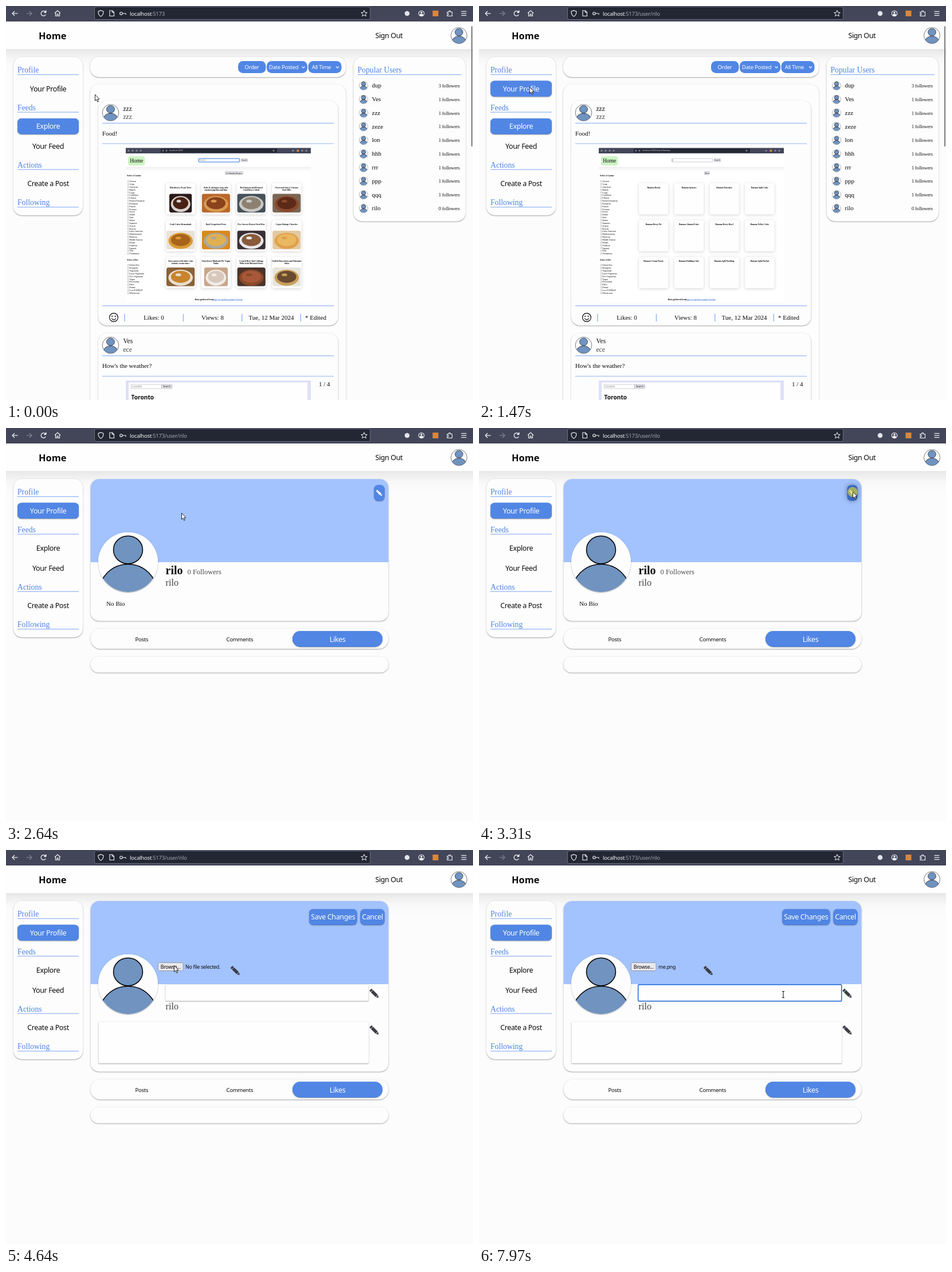
Write an HTML page with a canvas that moves like this. It is 815x687 px and loops after 8 s.

```html
<!DOCTYPE html>
<html lang="en">
<head>
<meta charset="utf-8">
<title>Profile editing</title>
<style>
html, body { margin: 0; width: 100%; height: 100%; overflow: hidden; background: #fcfcfc; }
canvas { display: block; width: 815px; height: 687px; }
</style>
</head>
<body>
<canvas id="stage"></canvas>
<script>
const W = 815, H = 687, LOOP = 8000;
const canvas = document.getElementById('stage');
const ctx = canvas.getContext('2d');
const dpr = window.devicePixelRatio || 1;
canvas.width = W * dpr;
canvas.height = H * dpr;

const SANS = '"Noto Sans", sans-serif', SERIF = '"Liberation Serif", serif';
const BLUE = '#5186e5', DARK = '#3a69c0', LINE = '#94b6f8', HEAD = '#4c83e4', INK = '#0a0a0a';
const ME = 'rilo';
const USERS = ['dup', 'Ves', 'zzz', 'zeze', 'lon', 'hhh', 'rrr', 'ppp', 'qqq', ME];

// Shadows as [alpha, blur, drop]
const SOFT = [[0.14, 2.2, 0.7], [0.3, 1.5, 0.8]];
const GLOW = [[0.4, 9, 0]];
const HAZE = [[0.13, 26, 5]];
const FAINT = [[0.17, 5, 1]];

// Drawing helpers
function text(s, x, y, size, o = {}) {
  const sans = o.sans || o.ui;
  ctx.font = `${o.bold ? 'bold ' : ''}${size}px ${sans ? SANS : SERIF}`;
  ctx.letterSpacing = sans && !o.bold ? `${-0.031 * size}px` : '0px';
  ctx.textAlign = o.align || 'left';
  ctx.fillStyle = o.color || INK;
  ctx.fillText(s, x, y);
}
const label = (s, x, y, size = 12.5, color = INK) => text(s, x, y, size, { sans: true, align: 'center', color });

function path(x, y, w, h, r) {
  ctx.beginPath();
  ctx.roundRect(x, y, w, h, r);
}
function box(x, y, w, h, r, fill, stroke, lw = 1) {
  path(x, y, w, h, r);
  if (fill) { ctx.fillStyle = fill; ctx.fill(); }
  if (stroke) { ctx.strokeStyle = stroke; ctx.lineWidth = lw; ctx.stroke(); }
}
function shadowed(x, y, w, h, r, fill, shadows = SOFT) {
  ctx.save();
  for (const [alpha, blur, drop] of shadows) {
    ctx.shadowColor = `rgba(0,0,0,${alpha})`;
    ctx.shadowBlur = blur * dpr;
    ctx.shadowOffsetY = drop * dpr;
    box(x, y, w, h, r, fill);
  }
  ctx.restore();
}
const card = (x, y, w, h, r = 15) => shadowed(x, y, w, h, r, '#fdfdfd');
function disc(x, y, rx, fill, stroke, lw = 1, ry = rx) {
  ctx.beginPath();
  ctx.ellipse(x, y, rx, ry, 0, 0, 7);
  if (fill) { ctx.fillStyle = fill; ctx.fill(); }
  if (stroke) { ctx.strokeStyle = stroke; ctx.lineWidth = lw; ctx.stroke(); }
}
function lines(pts, color, lw = 1, closed, fill) {
  ctx.beginPath();
  for (let i = 0; i < pts.length; i += 2) ctx.lineTo(pts[i], pts[i + 1]);
  if (closed) ctx.closePath();
  if (fill) { ctx.fillStyle = fill; ctx.fill(); }
  ctx.strokeStyle = color;
  ctx.lineWidth = lw;
  ctx.stroke();
}
const rule = (x1, x2, y) => lines([x1, y, x2, y], LINE, 1.2);

function avatar(x, y, r) {
  const k = r / 52, big = r > 30;
  if (big) shadowed(x - r, y - r, 2 * r, 2 * r, r, '#fdfdfd');
  ctx.save();
  ctx.beginPath();
  ctx.arc(x, y, r, 0, 7);
  ctx.clip();
  ctx.fillStyle = '#fdfdfd';
  ctx.fillRect(x - r, y - r, 2 * r, 2 * r);
  const lw = big ? 1.5 : 0.6;
  disc(x, y - 21.5 * k, 25.5 * k, '#7093c0', 'black', lw, 24.2 * k);
  disc(x, y + 54.8 * k, 51.4 * k, '#7093c0', 'black', lw);
  ctx.restore();
  if (!big) disc(x, y, r, null, r > 10 ? '#555a62' : '#a4a8ae', 0.8);
}

function pencil(x, y, k, color) {
  ctx.save();
  ctx.translate(x, y);
  ctx.rotate(Math.PI / 4);
  ctx.scale(k, k);
  ctx.fillStyle = color;
  path(-10, -2.7, 3.4, 5.4, 1);
  ctx.fill();
  ctx.fillRect(-6, -2.7, 11.5, 5.4);
  ctx.beginPath();
  ctx.moveTo(6.3, -2.7);
  ctx.lineTo(10.3, 0);
  ctx.lineTo(6.3, 2.7);
  ctx.fill();
  ctx.restore();
}

// Pointer
const clamp = u => Math.max(0, Math.min(1, u));
const span = (t, a, b) => clamp((t - a) / (b - a));
const smooth = u => u * u * (3 - 2 * u);
const mix = (a, b, u) => a + (b - a) * u;
const out = (u, n) => 1 - Math.pow(1 - u, n);

function pointer(t) {
  if (t < 2300) {
    const a = smooth(span(t, 40, 860)), b = span(t, 960, 1190);
    return [mix(155, 91, a) - 3 * b, mix(154, 143, a) - 2 * b];
  }
  if (t < 3580) {
    const u = smooth(span(t, 2280, 3130)), v = span(t, 3130, 3240);
    return [mix(88, 650, u) + 2 * v, mix(141, 112, u) + 24 * Math.sin(Math.PI * u) * (1 - u * 0.5) - v];
  }
  if (t < 5180) {
    const u = span(t, 3590, 4440);
    return [mix(652, 293, out(u, 1.9)), mix(111, 201, out(u, 3.2))];
  }
  if (t < 6780) return null;
  const u = smooth(span(t, 6720, 7400));
  return [mix(724, 531, u), mix(228, 252, u)];
}
const over = (p, x, y, w, h) => p && p[0] >= x && p[0] <= x + w && p[1] >= y && p[1] <= y + h;
const within = (t, a, b) => t >= a && t < b;
const clicking = t => within(t, 1330, 1470) || within(t, 3240, 3370) || within(t, 4570, 4640) || within(t, 7400, 7510);

function drawPointer(p, t) {
  if (!p) return;
  const [x, y] = p;
  if (clicking(t)) disc(x, y + 0.5, 8.7, 'rgba(222,214,50,.62)');
  if (t > 6780 && over(p, 278, 235, 355, 29)) {
    lines([x - 2, y - 5.5, x + 2, y - 5.5], 'black', 1);
    lines([x - 2, y + 5.5, x + 2, y + 5.5], 'black', 1);
    lines([x, y - 5.5, x, y + 5.5], 'black', 1);
    return;
  }
  ctx.save();
  ctx.translate(x + 0.5, y + 0.5);
  ctx.lineJoin = 'round';
  lines([0, 0, 0, 10.8, 2.4, 8.7, 4.2, 12.8, 5.9, 12, 4.2, 8.1, 7.3, 7.8], '#111', 0.9, true, 'white');
  ctx.restore();
}

// Browser bar
function browser(t) {
  const c = '#f4f4f8';
  ctx.fillStyle = '#434659';
  ctx.fillRect(0, 0, W, 27);
  box(154.5, 1.5, 481, 22, 2.5, '#232633', '#6a6d80');
  lines([20.5, 13, 11, 13], c, 1.2);
  lines([15, 9, 11, 13, 15, 17], c, 1.2);
  lines([36, 13, 45, 13], '#83859a', 1.2);
  lines([41, 9, 45, 13, 41, 17], '#83859a', 1.2);
  ctx.beginPath();
  ctx.arc(65.5, 13, 4.3, 0.5, 5.4);
  ctx.strokeStyle = c;
  ctx.lineWidth = 1.2;
  ctx.stroke();
  lines([70, 7.8, 70, 11.5, 66.5, 11.5], c, 1, true, c);
  lines([85, 12.5, 90, 8, 95, 12.5], c, 1.2);
  lines([86.5, 12, 86.5, 17.5, 89, 17.5, 89, 14, 91, 14, 91, 17.5, 93.5, 17.5, 93.5, 12], c, 1.1);
  ctx.beginPath();
  ctx.moveTo(165.5, 7.7);
  ctx.lineTo(170, 9.4);
  ctx.quadraticCurveTo(170, 16, 165.5, 18.2);
  ctx.quadraticCurveTo(161, 16, 161, 9.4);
  ctx.closePath();
  ctx.stroke();
  lines([181, 8, 185.5, 8, 188.5, 11, 188.5, 17.5, 181, 17.5], c, 1.1, true);
  lines([185.3, 8, 185.3, 11.2, 188.5, 11.2], c, 1);
  disc(201, 13, 2.3, null, c, 1.1);
  lines([203.4, 13, 209, 13, 209, 15.3], c, 1.1);
  text('localhost', 216, 16.5, 9.6, { ui: true, color: '#f8f8fb' });
  const w = ctx.measureText('localhost').width;
  text(':5173' + (t >= 1470 ? '/user/' + ME : ''), 216 + w, 16.5, 9.6, { ui: true, color: '#a3a5b2' });
  const star = [];
  for (let i = 0; i < 10; i++) {
    const a = -Math.PI / 2 + i * Math.PI / 5, r = i % 2 ? 2.5 : 5.6;
    star.push(625 + r * Math.cos(a), 13.2 + r * Math.sin(a));
  }
  lines(star, c, 1, true);
  disc(700, 13, 4.3, '#e4e4ec');
  disc(725, 13, 4.8, null, c, 1.1);
  disc(725, 11.4, 1.7, c);
  disc(725, 15.4, 3, c, null, 1, 1.8);
  box(744.5, 8, 10, 10, 0, '#d9873c');
  lines([770, 10.5, 773, 10.5, 773, 8.5, 775.5, 8.5, 775.5, 10.5, 778.5, 10.5, 778.5, 17.5, 770, 17.5, 770, 15, 772, 15, 772, 13, 770, 13], c, 1.1, true);
  for (const y of [9.5, 13, 16.5]) lines([794.5, y, 803.5, y], c, 1.2);
}

function header() {
  shadowed(-30, 27, W + 60, 48, 0, '#fefefe', HAZE);
  text('Home', 57, 58, 16.4, { sans: true, bold: true });
  text('Sign Out', 644.5, 56, 12.5, { sans: true });
  avatar(790.5, 51.5, 14);
}

function button(s, x, y, w, h, p, size = 12.5, dim = true) {
  const hot = dim && over(p, x, y, w, h);
  shadowed(x, y, w, h, 7, hot ? DARK : BLUE, hot ? GLOW : SOFT);
  if (s) label(s, x + w / 2, y + h / 2 + size * 0.36, size, 'white');
}

function sidebar(t, p) {
  card(13, 89, 121, 276);
  [['Profile', 116], ['Feeds', 181.5], ['Actions', 281.5], ['Following', 347]].forEach(([s, y]) => {
    text(s, 20, y, 13.7, { color: HEAD });
    rule(20, 127, y + 3.6);
  });
  const active = t < 1670 ? 'Explore' : 'Your Profile';
  [['Your Profile', 130.5], ['Explore', 196], ['Your Feed', 230.5], ['Create a Post', 296]].forEach(([s, y]) => {
    if (s === active || over(p, 20, y, 107, 27.5)) button(s, 20, y, 107, 27.5, p, 12.5, false);
    else label(s, 73.5, y + 18.3);
  });
}

// Recipe page shown inside the first post
const CUISINES = 'African,Asian,American,British,Cajun,Caribbean,Chinese,Eastern European,European,French,German,Greek,Indian,Irish,Italian,Japanese,Jewish,Korean,Latin American,Mediterranean,Mexican,Middle Eastern,Nordic,Southern,Spanish,Thai,Vietnamese'.split(',');
const DIETS = 'Gluten Free,Ketogenic,Vegetarian,Lacto-Vegetarian,Ovo-Vegetarian,Vegan,Pescetarian,Paleo,Primal,Low FODMAP,Wholesome'.split(',');
const DISHES = [
  ['Blackberry Pecan Torte', '#2a1a18 #d8d2cc #4a2214'],
  ['Kale & chickpea soup with|smoked paprika and lime', '#b9682c #d89a50 #8a431c'],
  ['Red Quinoa and Roasted|Cauliflower Salad', '#46525a #c9c8c4 #8d8272'],
  ['Sweet and Saucy Country|Style Ribs', '#7b6656 #8a4a2c #5c2a18'],
  ['Crab Cakes Remoulade', '#e9e2d8 #d99a35 #a8641c'],
  ['Basil Grapefruit Pesto', '#d98a1e #a9a8a0 #e0b050'],
  ['Five Savory Brown Fried Rice', '#3a3034 #e8e8ea #8a5a3c'],
  ['Cajun Shrimp Chowder', '#e3c9a0 #dfa04c #e9b860'],
  ['Swiss pasta with white wine|tomato cream sauce', '#8a6238 #e6dfd0 #c8842c'],
  ['Strawberry Rhubarb Pie Vegan|Shake', '#c9a68c #f0ede8 #d8c8bc'],
  ['Corned Beef And Cabbage|With Irish Mustard Sauce', '#4a332a #8a4a28 #a8583a'],
  ['Grilled Bruschetta and Balsamic|Salsa', '#e8e4dc #c9a05a #6a4a30']
];
const BANANA = 'Bread,Spritzer,Pancakes,Split Cake,Berry Pie,Almond Cake,Berry Bowl,Yellow Cake,Cream Pastry,Pudding Cake,Split Pudding,Split Parfait'.split(',');

function photo(x, y, w, colors) {
  const [back, plate, food] = colors.split(' ');
  ctx.save();
  path(x, y, w, 33, 4);
  ctx.clip();
  ctx.fillStyle = back;
  ctx.fillRect(x, y, w, 33);
  disc(x + w / 2, y + 18, w * 0.43, plate, null, 1, 14);
  disc(x + w / 2, y + 16.5, w * 0.34, food, null, 1, 10.5);
  disc(x + w * 0.42, y + 13, w * 0.1, plate, null, 1, 2.5);
  ctx.restore();
}

function checklist(title, items, y) {
  text(title, 211, y, 3.7, { bold: true });
  items.forEach((s, i) => {
    const by = y + 9.8 + i * 4.85;
    box(212, by - 2.8, 2.7, 2.7, 0.4, 'white', '#777', 0.4);
    text(s, 215.6, by, 3.7);
  });
}

function recipes(t) {
  const done = t >= 1190, small = { align: 'center', bold: true };
  ctx.fillStyle = 'white';
  ctx.fillRect(209, 248, 323, 268);
  ctx.fillStyle = '#434659';
  ctx.fillRect(209, 247.5, 323, 9.5);
  box(270, 248.5, 203, 7, 1, '#232633');
  for (const x of [214, 221, 228, 235, 274, 280, 467, 501, 517, 524]) disc(x, 252.2, 1.1, null, '#d8d8e0', 0.6);
  box(507.5, 250.5, 3.6, 3.6, 0, '#d9873c');
  text('localhost:3000' + (done ? '/search/banana' : ''), 285, 253.4, 3.7, { ui: true, color: '#d0d0d8' });
  const fade = ctx.createLinearGradient(0, 280, 0, 288);
  fade.addColorStop(0, '#eeeef0');
  fade.addColorStop(1, '#fefefe');
  ctx.fillStyle = fade;
  ctx.fillRect(209, 280.5, 323, 8);
  box(213, 262, 29.5, 16, 4, '#cdf5c3');
  text('Home', 227.7, 273, 9.4, { align: 'center' });

  box(336.5, 266, 71, 6, 0.5, 'white', done ? '#9a9aa2' : '#2d74dc', done ? 0.5 : 1);
  if (!done) {
    const typed = 'Banana'.slice(0, Math.floor(span(t, 180, 860) * 6));
    text(typed || 'Search...', 338, 270.3, 3.7, { color: typed ? INK : '#777' });
  } else lines([337.8, 267, 337.8, 271], INK, 0.4);
  box(410, 266.2, 11.5, 5.4, 0.6, '#e9e9ed', '#8f8f9d', 0.4);
  text('Search', 415.8, 270.2, 3.3, { align: 'center' });
  const bw = done ? 9 : 31;
  box(398 - bw / 2, 288.6, bw, 5.4, 0.6, '#e9e9ed', '#8f8f9d', 0.4);
  text(done ? 'More' : 'Get Random Recipes', 398, 292.5, 3.3, { align: 'center' });

  checklist('Select a Cuisine', CUISINES, 297.3);
  checklist('Select a Diet', DIETS, 443.5);
  DISHES.forEach(([name, colors], i) => {
    const x = 279 + i % 4 * 61.7, y = 309 + Math.floor(i / 4) * 64.2;
    shadowed(x, y, 51.5, 54.5, 4, '#fefefe', FAINT);
    const title = done ? 'Banana ' + BANANA[i] : name;
    title.split('|').forEach((s, j) => text(s, x + 25.7, y + 9 + j * 4, 3.7, small));
    const narrow = i === 0 ? 5 : i === 9 ? 4 : 0;
    if (!done) photo(x + 1 + narrow, y + 18.3, 49.5 - 2 * narrow, colors);
  });
  text('Data gathered from ', 329.5, 513, 3.9, { bold: true });
  text('https://recipedata.example/food-api', 361, 513, 3.7, { color: '#2460d0' });
  lines([361, 513.7, 412, 513.7], '#2460d0', 0.4);
}

function post(y, h, name, handle, body) {
  card(161, y, 418.5, h);
  avatar(182.5, y + 21, 14.3);
  text(name, 204.5, y + 17.8, 11.5);
  text(handle, 204.5, y + 32.3, 11.5, { color: '#444' });
  rule(168, 572, y + 39.3);
  text(body, 168, y + 60.7, 11);
  rule(168, 572, y + 75);
}

function feed(t, p) {
  card(147, 89, 446, 35);
  [['Order', 405, 48.5, 429], ['Date Posted', 455, 71, 484.5], ['All Time', 527.5, 58, 550.5]].forEach(([s, x, w, cx], i) => {
    box(x, 96, w, 21, 8.5, BLUE);
    label(s, cx, 110, 9.6, 'white');
    if (i) lines([x + w - 9.5, 105.5, x + w - 7, 108, x + w - 4.5, 105.5], 'white', 1.1);
  });
  card(147, 137, 446, 600);
  post(165, 392, 'zzz', 'zzz', 'Food!');
  recipes(t);
  rule(168, 572, 522.7);
  disc(188, 543, 7.4, null, INK, 1.2);
  disc(185.3, 541, 1.1, INK);
  disc(190.7, 541, 1.1, INK);
  ctx.beginPath();
  ctx.arc(188, 543.3, 3.8, 0.3, 2.84);
  ctx.strokeStyle = INK;
  ctx.lineWidth = 1.1;
  ctx.stroke();
  for (const x of [207, 309.5, 411.7, 514.3]) lines([x, 537, x, 550], LINE, 1.5);
  [['Likes: 0', 258], ['Views: 8', 360.5], ['Tue, 12 Mar 2024', 463], ['* Edited', 540.5]].forEach(([s, x]) =>
    text(s, x, 547, 11, { align: 'center' }));

  post(570.5, 200, 'Ves', 'ece', "How's the weather?");
  ctx.fillStyle = '#dfe0f8';
  ctx.fillRect(209, 653, 323, 40);
  ctx.fillStyle = '#fefefe';
  ctx.fillRect(214, 656.5, 312, 40);
  box(218.3, 660, 53, 7, 0, 'white', '#a0a0a8', 0.5);
  text('Location', 220, 665.4, 4.6, { ui: true, color: '#888' });
  box(271.5, 660, 18, 7, 0.5, '#e9e9ed', '#8f8f9d', 0.5);
  label('Search', 280.5, 665.4, 4.6, '#333');
  text('Toronto', 218.5, 686, 10.2, { sans: true, bold: true });
  text('1 / 4', 546, 663, 11);

  card(606.5, 89, 195.5, 286.5);
  text('Popular Users', 613.5, 116, 13.7, { color: HEAD });
  rule(613.5, 795, 119.6);
  USERS.forEach((s, i) => {
    const y = 139 + i * 23.78;
    avatar(624, y, 7.6);
    text(s, 638.5, y + 3.3, 11);
    const n = i === 0 ? 3 : i === 9 ? 0 : 1;
    text(n + ' followers', 792, y + 3, 8.2, { align: 'right' });
  });
  box(812, 35, 2, 210, 1, '#7d7d82');
}

// Profile page
function profile(t, p) {
  const edit = t >= 3370, dy = edit ? 50 : 0;
  card(147.5, 89, 520, 247.5 + dy);
  ctx.save();
  path(147.5, 89, 520, 247.5, 15);
  ctx.clip();
  ctx.fillStyle = '#a3c3fe';
  ctx.fillRect(147, 89, 521, 145);
  ctx.restore();
  avatar(213, 234, 52);
  if (edit) editor(t, p);
  else {
    button('', 642.5, 99.5, 18, 27.5, p);
    pencil(651.5, 113.5, 0.66, 'white');
    text(ME, 278.5, 254.5, 20, { bold: true });
    text('0 Followers', 316.5, 254.7, 12.5, { color: '#4a4a4a' });
    text(ME, 278.5, 274.7, 16.3, { color: '#444' });
    text('No Bio', 175, 310, 11.2);
  }
  card(147.5, 350 + dy, 520, 35, 17);
  label('Posts', 236.8, 371.8 + dy, 9.6);
  label('Comments', 407.8, 371.8 + dy, 9.6);
  shadowed(500, 354 + dy, 157, 27.5, 13.7, BLUE);
  label('Likes', 578.5, 372.5 + dy, 12.5, 'white');
  card(147.5, 399 + dy, 520, 27.5, 13.7);
}

function editor(t, p) {
  button('Save Changes', 529, 103, 83.5, 27.5, p);
  button('Cancel', 618.5, 103, 42, 27.5, p);
  const pressed = within(t, 4570, 4640), hot = t < 4570 && over(p, 265, 196, 44, 15);
  box(265.5, 196.5, 43.5, 14, 2, pressed ? '#b1b1b9' : hot ? '#d0d0d7' : '#e9e9ed', '#8f8f9d', 0.9);
  label('Browse...', 287.2, 206.8, 8.8);
  text(t < 6380 ? 'No file selected.' : 'me.png', 313, 206.8, 8.8, { sans: true });
  pencil(400.5, 210.8, 1, '#3c3c46');
  shadowed(278.5, 235, 354, 28, 1, '#fefefe');
  if (t >= 7510) box(277.7, 234.7, 355, 28.8, 1.5, '#fefefe', '#1565d8', 1.4);
  if (within(t, 7510, 7970)) lines([280.5, 236, 280.5, 262], 'black', 1);
  pencil(643, 250.5, 1, '#3c3c46');
  text(ME, 278.5, 278, 16.3, { color: '#444' });
  shadowed(161.5, 300, 471.5, 72, 1, '#fefefe');
  pencil(643, 314.5, 1, '#3c3c46');
}

function draw(t) {
  const p = pointer(t);
  ctx.setTransform(dpr, 0, 0, dpr, 0, 0);
  ctx.fillStyle = '#fcfcfc';
  ctx.fillRect(0, 0, W, H);
  header();
  browser(t);
  sidebar(t, p);
  if (t < 1670) feed(t, p);
  else profile(t, p);
  drawPointer(p, t);
}

const start = performance.now();
function tick() {
  draw((performance.now() - start) % LOOP);
  requestAnimationFrame(tick);
}
tick();
</script>
</body>
</html>
```
